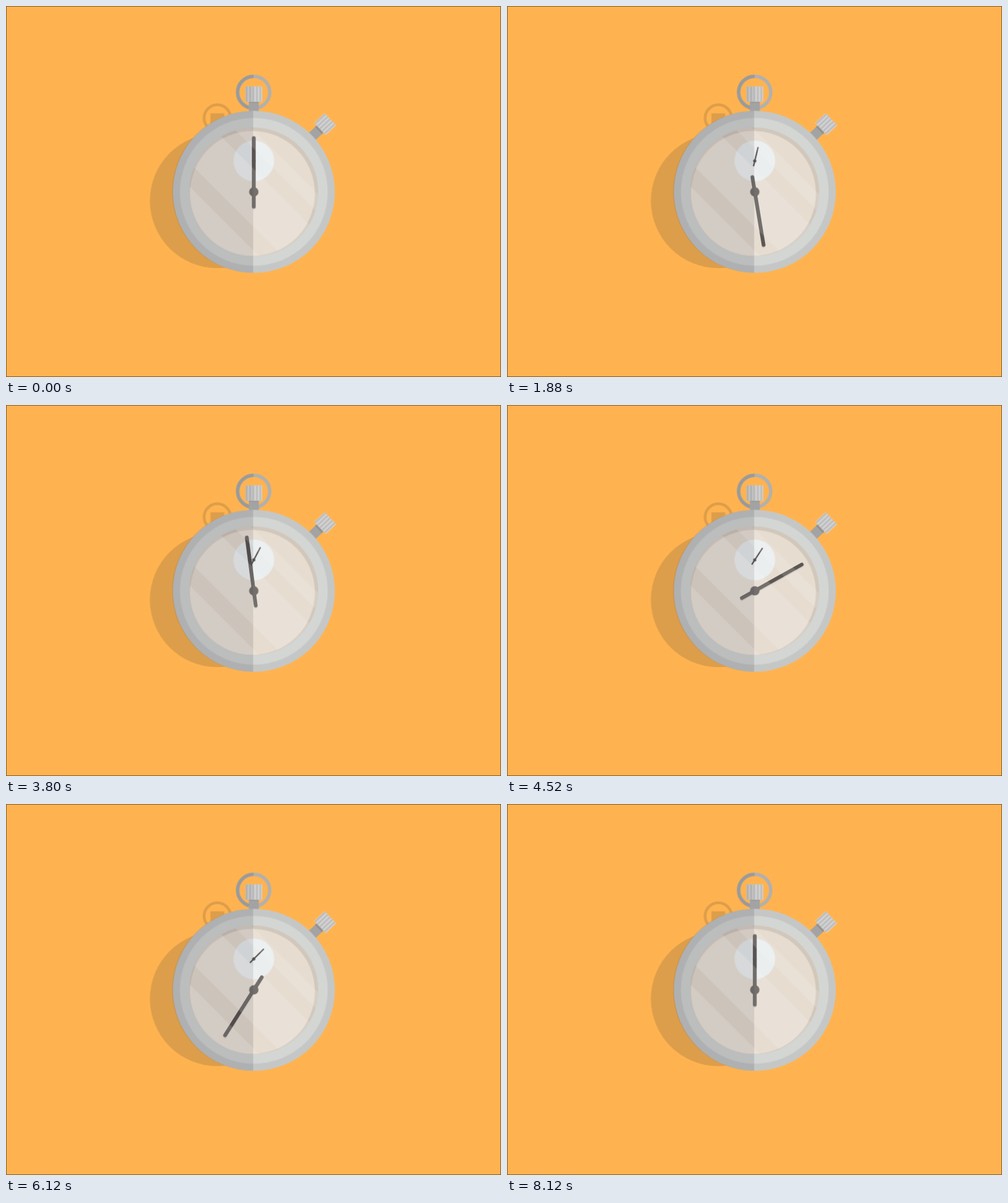
Write an HTML page that moves like this. It is 800 px wide and 600 px high and loops after 9.08 s.

```html
<!DOCTYPE html>
<html lang="en">
<head>
<meta charset="utf-8">
<title>Stopwatch</title>
<style>
  html, body { margin: 0; width: 100%; height: 100%; overflow: hidden; background: #ffb350; }
  svg { display: block; width: 100vw; height: 100vh; }

  .watch, .cast, .crown, .glare, .hand, .sub { animation: 9080ms infinite ease-in-out; }
  .watch { animation-name: watch; }
  .cast  { animation-name: cast; }
  .crown { animation-name: crown; }
  .glare { animation-name: glare; }
  .hand  { animation-name: hand; }
  .sub   { animation-name: sub; }

  /* Three presses: start, stop and reset */
  @keyframes watch {
    0%, 4.405%, 74.89%, 79.3%, 84.58%, 88.99%, 100% { transform: translate(400.5px, 300.5px); }
    1.322%, 76.21%, 85.9% { transform: translate(394px, 305.7px) scale(.977); }
  }
  @keyframes cast {
    0%, 4.405%, 74.89%, 79.3%, 84.58%, 88.99%, 100% { transform: translate(341.5px, 315px) scale(.832); }
    1.322%, 76.21%, 85.9% { transform: translate(344.6px, 314.3px) scale(.875); }
  }
  @keyframes crown {
    0%, 4.405%, 74.89%, 79.3%, 84.58%, 88.99%, 100% { transform: translateY(0); }
    1.322%, 76.21%, 85.9% { transform: translateY(8.5px); }
  }
  @keyframes glare {
    0%, 4.405%, 74.89%, 79.3%, 84.58%, 88.99%, 100% { transform: translateY(0); }
    1.322%, 76.21%, 85.9% { transform: translateY(15px); }
  }
  @keyframes hand {
    0% { transform: rotate(0deg); }
    .881% { transform: rotate(0deg); animation-timing-function: linear; }
    76.21%, 85.46% { transform: rotate(648deg); }
    89.43%, 100% { transform: rotate(720deg); }
  }
  @keyframes sub {
    0% { transform: rotate(0deg); }
    .881% { transform: rotate(0deg); animation-timing-function: linear; }
    76.21%, 85.46% { transform: rotate(51deg); }
    89.43%, 100% { transform: rotate(0deg); }
  }
</style>
</head>
<body>
<svg viewBox="0 0 800 600">
  <defs>
    <clipPath id="dish"><circle r="104"/></clipPath>
    <g id="knob">
      <rect x="-8" y="-148" width="16" height="24" fill="#a3a3a3"/>
      <rect x="-8" y="-148" width="16" height="4" fill="#929292"/>
    </g>
    <g id="ridges">
      <rect x="-13.5" width="27" height="25" fill="#d2d2d2"/>
      <path d="M-11.5 0v25M-6 0v25M-.5 0v25M5 0v25M10.5 0v25" stroke="#bcbcbc" stroke-width="2.6"/>
    </g>
  </defs>

  <rect width="800" height="600" fill="#ffb350"/>

  <g class="cast" fill="#dd9e4b">
    <circle r="131"/>
    <rect x="-13.5" y="-170" width="27" height="50"/>
    <circle cy="-161" r="25.7" fill="none" stroke="#dd9e4b" stroke-width="5.5"/>
  </g>

  <g class="watch">
    <g transform="rotate(46.5)">
      <g class="crown">
        <use href="#knob"/>
        <use href="#ridges" transform="translate(0 -170.5) scale(1 .92)"/>
      </g>
    </g>

    <g fill="none" stroke-width="5.4">
      <circle cy="-161" r="25.8" stroke="#b0b0b0"/>
      <path d="M-.5 -186.8A25.8 25.8 0 0 0 -.5 -135.2" stroke="#9a9a9a"/>
    </g>
    <use href="#knob"/>
    <use href="#ridges" y="-170.5"/>
    <rect x="-13.5" y="-170.5" width="12.5" height="25" fill="#000" opacity=".07"/>

    <circle r="131" fill="#c5c7c6"/>
    <circle r="119.5" fill="#d4d6d4"/>
    <circle r="104" fill="#d1c7bb"/>
    <circle cx="-2.2" cy="2.6" r="101" fill="#e6dcd0"/>
    <circle cy="-50" r="33" fill="#eaeeee"/>

    <g fill="#5b5653" stroke="#5b5653" stroke-linecap="round">
      <g class="sub-dial" transform="translate(0 -50)">
        <g class="sub">
          <path d="M0 -22V8" stroke-width="2.3"/>
          <circle r="2.6" stroke="none"/>
        </g>
      </g>
      <g transform="translate(0 2)" opacity=".16">
        <path class="hand" d="M0 -87V24" stroke-width="6"/>
      </g>
      <path class="hand" d="M0 -87V24" stroke-width="6"/>
      <circle r="7.6" stroke="none"/>
    </g>

    <path d="M-1 -131A131 131 0 0 0 -1 131Z" fill="#0f0519" opacity=".115"/>

    <g clip-path="url(#dish)">
      <g class="glare" fill="#fff" opacity=".15">
        <path d="M-150 -187L150 113V157L-150 -143Z" transform="translate(0 150)"/>
        <path d="M-150 -187L150 113V207L-150 -93Z"/>
        <path d="M-150 -55L150 245V280L-150 -20Z"/>
        <path d="M-150 -250L150 50V80L-150 -220Z" opacity=".9"/>
      </g>
    </g>
  </g>

  <rect x=".5" y=".5" width="799" height="599" fill="none" stroke="#7d5a2b"/>
</svg>
</body>
</html>
```
